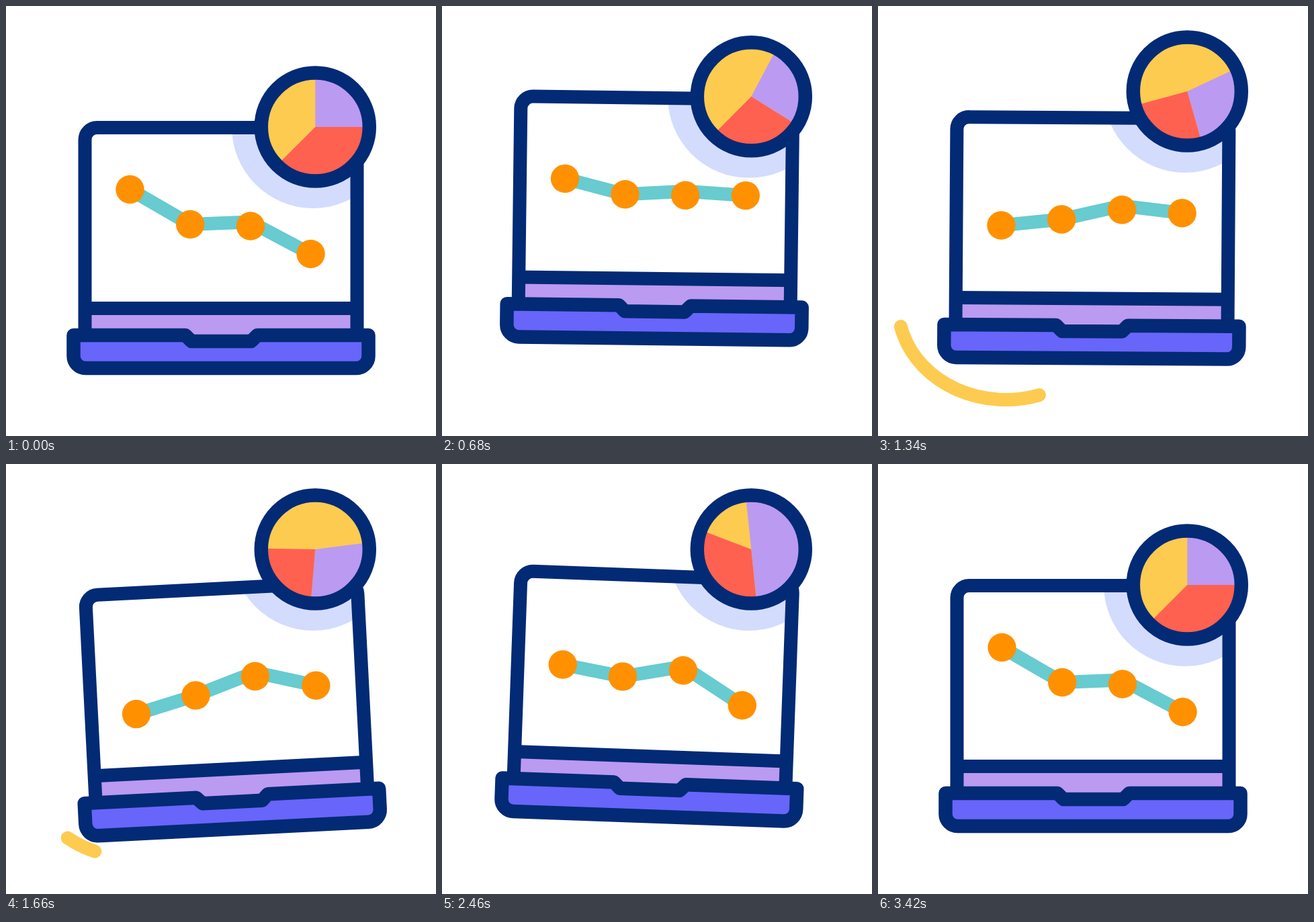
These frames come from a looping animation (640x640 px, 3.6 s). An HTML page with a canvas:

```html
<!DOCTYPE html>
<html lang="en">
<head>
<meta charset="utf-8">
<title>Laptop charts</title>
<style>
  html, body { margin: 0; width: 100%; height: 100%; overflow: hidden; background: #fff; }
  canvas { display: block; width: 100%; height: 100%; }
</style>
</head>
<body>
<canvas id="stage" width="640" height="640"></canvas>
<script>
const ctx = document.getElementById('stage').getContext('2d');
const LOOP = 3600;
const TAU = Math.PI * 2;
const RAD = Math.PI / 180;
const NAVY = '#032a75', LILAC = '#bb9af1', BLUE = '#6865fa', YELLOW = '#fdcb50';
const RED = '#ff6151', TEAL = '#67cbd0', ORANGE = '#ff9100', PALE = '#d3dcfd';
const HUB = { x: 460.3, y: 180 };

const linear = s => s;
const ease = s => s * s / (s * s + (1 - s) * (1 - s));
const clamp = s => Math.min(1, Math.max(0, s));

// Rises from 0 to 1 over a..b, holds until c, falls back by d
function swell(t, a, b, c, d, shape = ease) {
  return t < c ? shape(clamp((t - a) / (b - a))) : shape(clamp((d - t) / (d - c)));
}

const laptopLift = t => -53.5 * (swell(t, 185, 935, 935, 1580) + swell(t, 1580, 2010, 2010, 2670));
const laptopTilt = t => 3 * swell(t, 432, 1130, 2320, 2670) - 6 * swell(t, 1130, 1580, 1580, 2320);
const ringLift = t => -53 * swell(t, 185, 888, 2468, 3172);

// Degrees clockwise from the top where each slice begins
const pieCuts = t => [
  85 * swell(t, 185, 1700, 1960, 2460, linear) - 6 * swell(t, 1960, 2460, 2820, 3400, linear),
  90 + 114 * swell(t, 185, 1960, 2130, 3400, linear),
  225 + 66 * swell(t, 750, 2060, 2460, 3400, linear)
];

// The first three dots set off in turn, meet their extremes together and return
function chartDots(t) {
  const sweep = from => swell(t, from, 1960, 1960, 2830, linear);
  const ys = [
    273 + 106 * sweep(185),
    325 + 18 * sweep(900),
    327.5 - 17 * sweep(500),
    369 - 47 * swell(t, 185, 800, 1340, 2270)
  ];
  return ys.map((y, i) => ({ x: 184.5 + 89.7 * i, y }));
}

function stroke(color, width = 20) {
  ctx.strokeStyle = color;
  ctx.lineWidth = width;
  ctx.stroke();
}

function disc(x, y, r, color) {
  ctx.beginPath();
  ctx.arc(x, y, r, 0, TAU);
  ctx.fillStyle = color;
  ctx.fill();
}

// An arc that opens from its middle and closes back into it
function swoosh(x, y, rx, ry, from, to, open) {
  if (open <= 0) return;
  const mid = (from + to) / 2, half = (to - from) / 2 * open;
  ctx.lineCap = 'round';
  ctx.beginPath();
  ctx.ellipse(x, y, rx, ry, 0, (mid - half) * RAD, (mid + half) * RAD);
  stroke(YELLOW);
}

function lidPath() {
  ctx.beginPath();
  ctx.moveTo(117.5, 490);
  ctx.arcTo(117.5, 181, 320, 181, 18);
  ctx.arcTo(522.5, 181, 522.5, 490, 18);
  ctx.lineTo(522.5, 490);
}

function basePath() {
  ctx.beginPath();
  ctx.moveTo(100.5, 490);
  ctx.lineTo(267, 490);
  ctx.lineTo(276, 499);
  ctx.lineTo(365, 499);
  ctx.lineTo(374, 490);
  ctx.lineTo(539.5, 490);
  ctx.arcTo(539.5, 539, 320, 539, 18);
  ctx.arcTo(100.5, 539, 100.5, 490, 18);
  ctx.closePath();
}

function chart(t) {
  const dots = chartDots(t);
  // The line bends slightly above the third dot
  const bendY = i => dots[i].y - (i === 2 ? 6 : 0);
  ctx.lineCap = 'butt';
  for (let i = 0; i < 3; i++) {
    ctx.beginPath();
    ctx.moveTo(dots[i].x, bendY(i));
    ctx.lineTo(dots[i + 1].x, bendY(i + 1));
    stroke(TEAL);
  }
  for (const { x, y } of dots) disc(x, y, 21.2, ORANGE);
}

function laptop(t, ringY) {
  const lift = laptopLift(t), tilt = laptopTilt(t) * RAD;
  const pose = () => {
    ctx.translate(460, 180 + lift);
    ctx.rotate(tilt);
    ctx.translate(-460, -180);
  };

  // The pale halo follows the ring but stays inside the tilted screen
  ctx.save();
  ctx.save();
  pose();
  lidPath();
  ctx.restore();
  ctx.fillStyle = '#fff';
  ctx.fill();
  ctx.clip();
  disc(457, ringY, 121, PALE);
  ctx.restore();

  ctx.save();
  pose();
  ctx.lineJoin = 'round';
  ctx.lineCap = 'butt';
  ctx.fillStyle = LILAC;
  ctx.fillRect(117.5, 450, 405, 40);
  ctx.beginPath();
  ctx.moveTo(117.5, 450);
  ctx.lineTo(522.5, 450);
  stroke(NAVY);
  lidPath();
  stroke(NAVY);
  basePath();
  ctx.fillStyle = BLUE;
  ctx.fill();
  stroke(NAVY, 20.5);
  chart(t);
  ctx.restore();
}

function pie(t, y) {
  const cuts = pieCuts(t);
  disc(HUB.x, y, 74, YELLOW);
  [LILAC, RED].forEach((color, i) => {
    ctx.beginPath();
    ctx.moveTo(HUB.x, y);
    ctx.arc(HUB.x, y, 75, (cuts[i] - 90) * RAD, (cuts[i + 1] - 90) * RAD);
    ctx.fillStyle = color;
    ctx.fill();
  });
  ctx.beginPath();
  ctx.arc(HUB.x, y, 80.5, 0, TAU);
  stroke(NAVY, 20.5);
}

function draw(t) {
  const ringY = HUB.y + ringLift(t);
  ctx.fillStyle = '#fff';
  ctx.fillRect(0, 0, 640, 640);
  swoosh(190, 446.4, 160, 139.6, 71.8, 167.3, swell(t, 800, 1200, 1360, 1800));
  laptop(t, ringY);
  swoosh(461.5, 183, 140, 140, -95, 5, swell(t, 2880, 3120, 3160, 3400));
  pie(t, ringY);
}

const start = performance.now();
function tick() {
  draw((performance.now() - start) % LOOP);
  requestAnimationFrame(tick);
}
tick();
</script>
</body>
</html>
```
